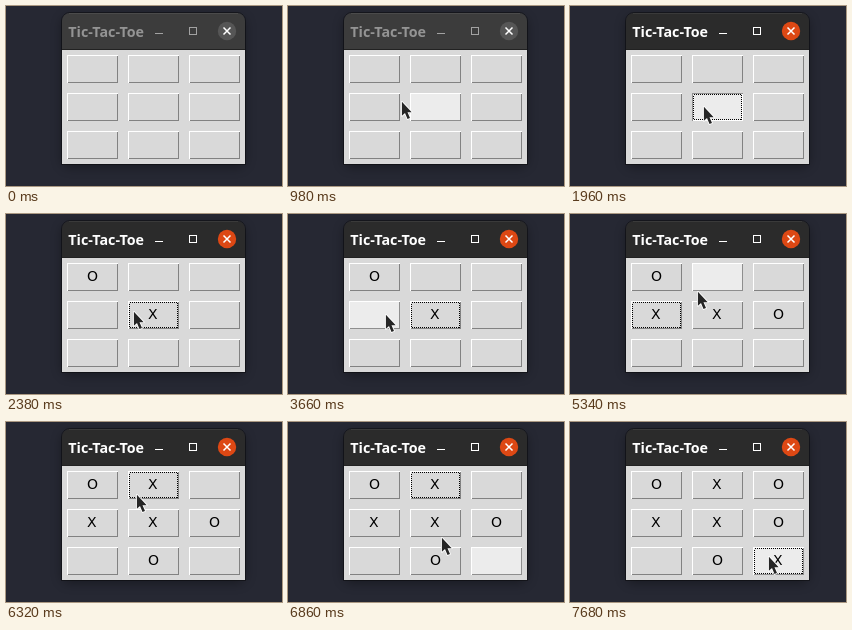
Write an HTML page that moves like this. It is 276 px wide and 180 px high and loops after 8000 ms.

```html
<!DOCTYPE html>
<html lang="en">
<head>
<meta charset="utf-8">
<title>Tic-Tac-Toe</title>
<style>
  html, body { margin: 0; width: 100%; height: 100%; overflow: hidden; background: #262833; }
  svg { display: block; width: 100%; height: 100%; }
  .crisp { shape-rendering: crispEdges; }
  .bar { fill: #3c3c3c; }
  .edge { stroke: #4b4b4b; }
  .title { font: bold 14.3px "Open Sans", "Noto Sans", sans-serif; fill: #949494; }
  .mark { font: 14px "DejaVu Sans", sans-serif; fill: #000; }
  .ctl { stroke: #a2a2a2; fill: none; }
  .close { fill: #565656; }
  .active .bar { fill: #2b2b2b; }
  .active .edge { stroke: #3a3a3a; }
  .active .title { fill: #fff; }
  .active .ctl { stroke: #fff; }
  .active .close { fill: #dd4814; }
  .cell { --face: #d9d9d9; --light: #fff; --dark: #828282; }
  .lit { --face: #ececec; --dark: #8e8e8e; }
  .down { --light: #8e8e8e; --dark: #fff; }
  .face { fill: var(--face); }
  .hi { stroke: var(--light); fill: none; }
  .lo { stroke: var(--dark); fill: none; }
  .ring { fill: none; stroke: #000; stroke-dasharray: 1 1; visibility: hidden; }
  .focus .ring { visibility: visible; }
</style>
</head>
<body>
<svg viewBox="0 0 276 180">
  <defs>
    <filter id="blur" x="-20%" y="-20%" width="140%" height="140%">
      <feGaussianBlur stdDeviation="6"/>
    </filter>
  </defs>
  <rect width="276" height="180" fill="#262833"/>
  <rect x="56" y="11" width="183" height="150" rx="8" fill="#000" opacity=".36" filter="url(#blur)"/>
  <g id="win">
    <path d="M55.5 158.5V15a8.5 8.5 0 0 1 8.5-8.5H231a8.5 8.5 0 0 1 8.5 8.5V158.5Z" fill="none" stroke="#000" stroke-opacity=".4"/>
    <path class="bar" d="M56 44V15a8 8 0 0 1 8-8H231a8 8 0 0 1 8 8V44Z"/>
    <path class="edge" d="M63 7.5H232"/>
    <path class="crisp" d="M56 43.5H239" stroke="#222"/>
    <rect class="crisp" x="56" y="44" width="183" height="114" fill="#d9d9d9"/>
    <text class="title" x="62.3" y="31">Tic-Tac-Toe</text>
    <path class="ctl crisp" d="M149 27.5H157M183.5 21.5H190.5V28.5H183.5Z"/>
    <circle class="close" cx="221" cy="25" r="9.2"/>
    <path d="M217.5 21.5l7 7m0-7l-7 7" stroke="#fff" stroke-width="1.5"/>
    <g id="board"></g>
  </g>
  <path id="cursor" d="M.9 1.8V15.8L4 13 6.5 19 9 18 6.5 12.2H10.7Z"
        fill="#252525" stroke="#fff" stroke-width="1.7" stroke-linejoin="round" paint-order="stroke"/>
</svg>
<script>
const LOOP = 8000, PRESS = 140;
const $ = id => document.getElementById(id);
const win = $('win'), board = $('board'), cursor = $('cursor');

// Cells are numbered row by row, times are in ms.
const turns = [
  { cell: 4, reply: 0, over: 920, press: 1960, mark: 2100, out: 2380 },
  { cell: 3, reply: 5, over: 3380, press: 3780, mark: 3940, out: 4640 },
  { cell: 1, reply: 7, over: 5340, press: 5720, mark: 5720, out: 6320 },
  { cell: 8, reply: 2, over: 6840, press: 7400, mark: 7440, out: LOOP }
];
// Cells the pointer crosses without a click
const passes = [
  { cell: 0, over: 640, out: 840 },
  { cell: 0, over: 2540, out: 3200 },
  { cell: 4, over: 6440, out: 6780 }
];
const hovers = [...turns, ...passes];

// Pointer moves: start time, x, y and, for a glide, its length
const path = [
  [580, 53, 27], [580, 113, 94, 400], [1120, 123, 99], [1680, 133, 99],
  [2260, 127, 96], [2540, 111, 76], [2820, 104, 69], [3340, 97, 95, 40],
  [3660, 97, 99], [4780, 124, 79], [5060, 127, 76], [5720, 130, 71],
  [6700, 156, 119, 180], [7020, 190, 132], [7400, 198, 133]
];

for (let i = 0; i < 9; i++) {
  const x = 61 + i % 3 * 61, y = 49 + Math.floor(i / 3) * 38;
  board.insertAdjacentHTML('beforeend', `<g class="cell" transform="translate(${x} ${y})">
    <g class="crisp">
      <rect class="face" width="51" height="28"/>
      <path class="lo" d="M0 27.5H50.5V0"/>
      <path class="hi" d="M.5 28V.5H51"/>
      <rect class="ring" x="1.5" y="1.5" width="48" height="25"/>
    </g>
    <text class="mark" x="20" y="18"></text>
  </g>`);
}
const cells = [...board.children];
const marks = cells.map(c => c.querySelector('text'));

function pointer(t) {
  const n = path.filter(p => p[0] <= t).length - 1;
  if (n < 0) return null;
  const [start, x, y, glide] = path[n];
  const k = glide ? Math.min(1, (t - start) / glide) : 1;
  const [, px, py] = path[Math.max(0, n - 1)];
  return [px + (x - px) * k, py + (y - py) * k].map(Math.round);
}

function draw(t) {
  const current = turns.filter(m => m.press <= t).pop();
  win.classList.toggle('active', Boolean(current));
  cells.forEach((cell, i) => {
    const focused = current?.cell === i;
    cell.classList.toggle('lit', hovers.some(h => h.cell === i && t >= h.over && t < h.out));
    cell.classList.toggle('focus', focused);
    cell.classList.toggle('down', focused && t < current.press + PRESS);
    const turn = turns.find(m => t >= m.mark && (m.cell === i || m.reply === i));
    marks[i].textContent = !turn ? '' : turn.cell === i ? 'X' : 'O';
  });
  const at = pointer(t);
  cursor.setAttribute('visibility', at ? 'visible' : 'hidden');
  if (at) cursor.setAttribute('transform', `translate(${at})`);
}

const start = performance.now();
function tick() {
  draw((performance.now() - start) % LOOP);
  requestAnimationFrame(tick);
}
tick();
</script>
</body>
</html>
```
